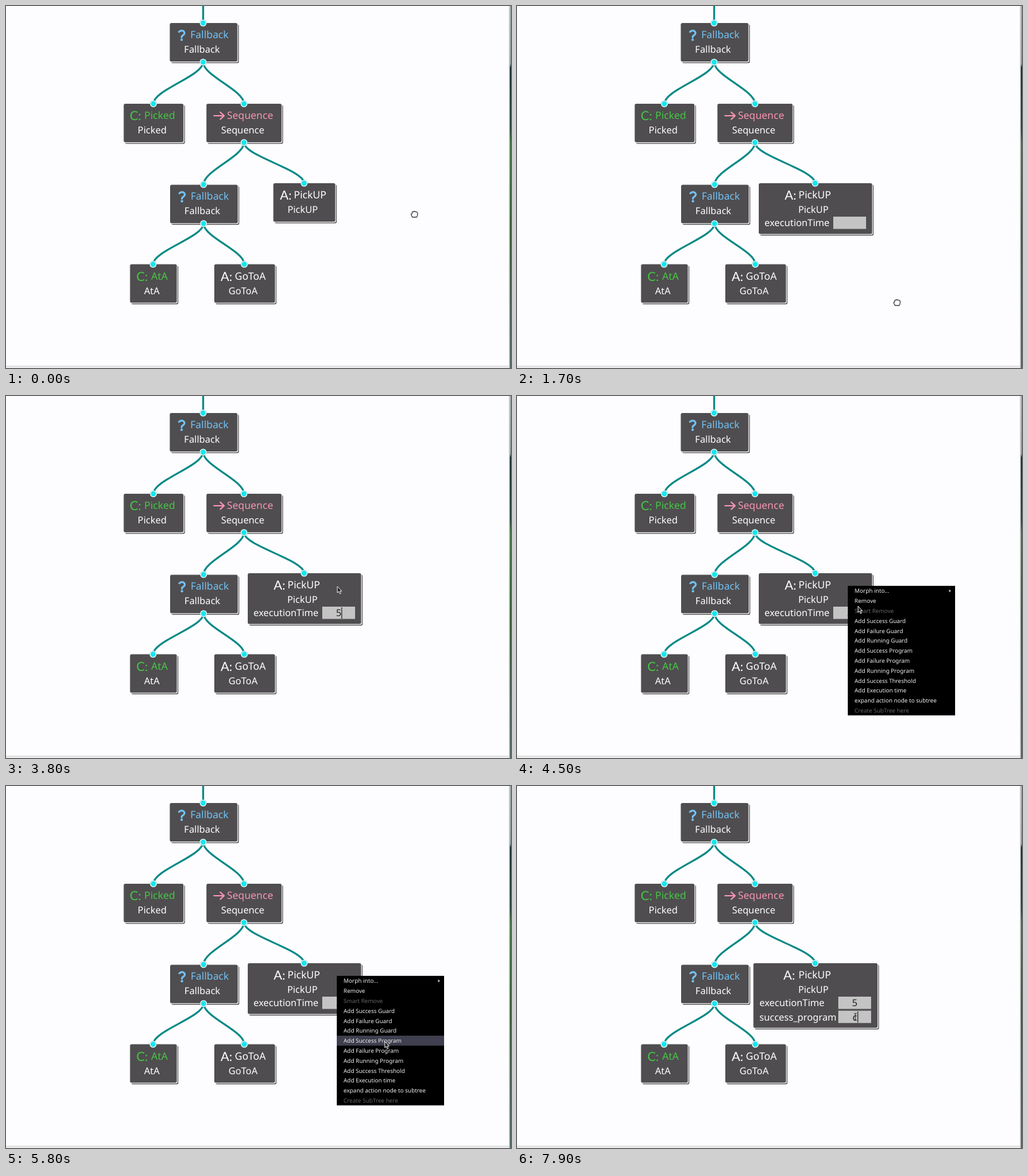
Recreate the animation shown at these times as an HTML page. Size 800 by 574 pixels, loop 8 s.

```html
<!DOCTYPE html>
<html lang="en">
<head>
<meta charset="utf-8">
<title>Behavior tree editor</title>
<style>
  html, body { margin: 0; width: 100%; height: 100%; overflow: hidden; background: #fdfcfe; }
  svg { display: block; width: 800px; height: 574px; }
  text { font-family: "Noto Sans", "Open Sans", sans-serif; fill: #fff; text-rendering: geometricPrecision; white-space: pre; }
  .edge { fill: none; stroke: #058985; stroke-width: 3; }
  .title { font-size: 16px; }
  .label { font-size: 15px; }
  .mid { text-anchor: middle; }
  .kind { font: 400 20px Lato, "Noto Sans", sans-serif; }
  .value { font-size: 15px; fill: #222; text-anchor: middle; }
  .item { font-size: 9.05px; fill: #f0f0f0; }
  .off { fill: #666; }
</style>
</head>
<body>
<svg id="stage" viewBox="0 0 800 574">
  <defs>
    <linearGradient id="strip" x1="0" y1="0" x2="0" y2="1">
      <stop offset="0" stop-color="#a3abad"/>
      <stop offset=".16" stop-color="#8d999b"/>
      <stop offset=".17" stop-color="#1d3234"/>
      <stop offset=".34" stop-color="#2c4a42"/>
      <stop offset=".38" stop-color="#4a7a48"/>
      <stop offset=".62" stop-color="#3b6339"/>
      <stop offset=".8" stop-color="#4f6358"/>
      <stop offset="1" stop-color="#5d6c6c"/>
    </linearGradient>
  </defs>
  <rect width="800" height="574" fill="#fdfcfe"/>
  <rect y="571" width="798" height="3" fill="#ececee"/>
  <rect y="570.5" width="798" height="1" fill="#d2d2d5"/>
  <rect x="796.5" width="1.5" height="574" fill="#d3d5d8"/>
  <rect x="798" width="2" height="574" fill="url(#strip)"/>
  <g id="edges"></g>
  <g id="nodes"></g>
  <g id="ports"></g>
  <g id="menu"></g>
  <g id="hand" fill="#fff" stroke="#222" stroke-width="1" stroke-linejoin="round">
    <path transform="scale(1.08)" d="M-3 4.5 L-4.6 1.5 Q-5.4 -.8 -3.4 -.6 L-3.4 -2.4 Q-3 -4 -1.6 -3.3 Q-.3 -4.8 1 -3.4 Q2.5 -4.3 3.2 -2.8 Q4.8 -2.8 4.7 -1 L4.4 2 L3.4 4.5 Z"/>
  </g>
  <path id="arrow" d="M0 0 V10 L2.3 8 L4 11.8 L5.7 11 L4.1 7.4 H7 Z" fill="#222" stroke="#fff" stroke-width=".9"/>
  <path id="beam" d="M-2 -5.5 Q0 -5.5 0 -4.5 Q0 -5.5 2 -5.5 M0 -4.5 V4.5 M-2 5.5 Q0 5.5 0 4.5 Q0 5.5 2 5.5" fill="none" stroke="#222" stroke-width="1"/>
</svg>
<script>
const LOOP = 8000, STEP = 100, ROW = 15.8, BEND = .33;
const GREEN = '#45c645', BLUE = '#72c2f5', PINK = '#f694b2', WHITE = '#fff';
const $ = id => document.getElementById(id);

function add(parent, tag, attrs, content) {
  const el = document.createElementNS('http://www.w3.org/2000/svg', tag);
  for (const key in attrs) el.setAttribute(key, attrs[key]);
  if (content !== undefined) el.textContent = content;
  parent.append(el);
  return el;
}
const show = (el, on) => el.setAttribute('visibility', on ? 'visible' : 'hidden');
const place = (el, x, y) => el.setAttribute('transform', `translate(${x} ${y})`);

// Text is placed by its visual middle line.
function write(parent, cls, x, y, str, fill) {
  const el = add(parent, 'text', { class: cls, x, y: y + 5.4 }, str);
  if (fill) el.style.fill = fill;
  return el;
}

function icon(g, kind, x, y, color) {
  const line = { fill: 'none', stroke: color, 'stroke-linecap': 'round', 'stroke-linejoin': 'round' };
  if (kind === '?') {
    add(g, 'path', { ...line, 'stroke-width': 3, d: `M${x + 2} ${y - 5} Q${x + 5} ${y - 7.7} ${x + 8.5} ${y - 6.6} Q${x + 12.5} ${y - 4} ${x + 9.5} ${y - .5} Q${x + 6.2} ${y + 1.5} ${x + 6.2} ${y + 3.4}` });
    add(g, 'circle', { cx: x + 6.2, cy: y + 7.6, r: 2, fill: color });
  } else if (kind === '>') {
    add(g, 'path', { ...line, 'stroke-width': 2.2, d: `M${x + 1} ${y} H${x + 17} m-6 -5.5 l6 5.5 l-6 5.5` });
  } else {
    add(g, 'text', { class: 'kind', x, y: y + 7, style: `fill:${color}` }, kind);
  }
}

function node(x, y, w, h, kind, color, iconX, titleX, titleY, title, subX) {
  const g = add($('nodes'), 'g', {});
  const plate = (from, to, fill) => add(g, 'rect', {
    x: x + from, y: y + from, width: w + to - from, height: h + to - from, rx: 2.5, fill
  });
  plate(1.5, 1.9, '#4c4c4c');
  plate(-1.5, .8, '#fafafa');
  plate(-.5, -.4, '#4f4d4f');
  icon(g, kind, iconX, titleY, color);
  write(g, 'title', titleX, titleY, title, color);
  write(g, 'label mid', subX, titleY + 22.7, title);
  return g;
}

function field(g, labelX, y, name, x) {
  write(g, 'label', labelX, y, name);
  add(g, 'rect', { x, y: y - 10, width: 52, height: 19.5, fill: '#c4c4c4' });
  const mid = x + 26;
  const value = write(g, 'value', mid, y, '');
  const caret = add(g, 'rect', { y: y - 9, width: 1.2, height: 18, fill: '#222' });
  return (str, focused) => {
    value.textContent = str;
    caret.setAttribute('x', mid + (str ? 4.3 : 0));
    caret.setAttribute('opacity', focused ? 1 : 0);
  };
}

function edge(x1, y1, x2, y2) {
  const pull = (y2 - y1) * BEND;
  add($('edges'), 'path', { class: 'edge', d: `M${x1} ${y1} C${x1} ${y1 + pull} ${x2} ${y2 - pull} ${x2} ${y2}` });
}

function port(x, y) {
  add($('ports'), 'circle', { cx: x, cy: y, r: 5.6, fill: '#8a9c9c' });
  add($('ports'), 'circle', { cx: x, cy: y, r: 4.7, fill: '#14e7ee', stroke: '#fff', 'stroke-width': 1.1 });
}

edge(312.3, -40, 312.3, 27);
edge(312.3, 89, 233.5, 155);
edge(312.3, 89, 377, 155);
edge(377, 216.5, 313, 283);
edge(377, 216.5, 472.3, 281);
edge(313, 345, 233, 409.5);
edge(313, 345, 377.5, 409.5);
[[312.3, 27], [312.3, 89], [233.5, 155], [377, 155], [377, 216.5], [313, 283],
 [472.3, 281], [313, 345], [233, 409.5], [377.5, 409.5]].forEach(p => port(...p));

node(260, 27.5, 107, 61, '?', BLUE, 272, 292, 46, 'Fallback', 310.5);
node(187, 155.5, 94.5, 61, 'C:', GREEN, 196, 219, 174, 'Picked', 231.5);
node(318, 155.5, 119, 61, '>', PINK, 328.5, 350, 174, 'Sequence', 375);
node(260.5, 284, 107, 61, '?', BLUE, 272.5, 292.5, 302, 'Fallback', 311);
node(197, 410, 74, 61, 'C:', GREEN, 206.5, 230, 428.5, 'AtA', 231);
node(330.5, 410, 96, 61, 'A:', WHITE, 340, 362.5, 428.5, 'GoToA', 375.5);

// The action node in its three sizes.
const boxes = [[424, 281.5, 98, 61], [383.5, 281.5, 179.5, 80.5], [375, 281.5, 196.5, 102.5]];
const sizes = [[434, 456, 470], [424, 446, 469.5], [422, 446, 469.5]].map(([iconX, titleX, subX], i) =>
  node(...boxes[i], 'A:', WHITE, iconX, titleX, 299.6, 'PickUP', subX));
const timeAlone = field(sizes[1], 392, 344, 'executionTime', 501);
const timeField = field(sizes[2], 384, 344, 'executionTime', 509);
const programField = field(sizes[2], 384, 366.3, 'success_program', 509);
timeField('5', false);

const items = ['Morph into...', 'Remove', 'Smart Remove', 'Add Success Guard', 'Add Failure Guard',
  'Add Running Guard', 'Add Success Program', 'Add Failure Program', 'Add Running Program',
  'Add Success Threshold', 'Add Execution time', 'expand action node to subtree', 'Create SubTree here'];
const disabled = [2, 12];
const menu = $('menu');
add(menu, 'rect', { width: 170, height: 205.4, fill: '#000' });
const hover = add(menu, 'rect', { width: 170, height: ROW, fill: '#3f3f4f' });
items.forEach((name, i) => add(menu, 'text', {
  class: disabled.includes(i) ? 'item off' : 'item', x: 10.8, y: 11.3 + i * ROW
}, name));
add(menu, 'path', { d: 'M160.5 5.8 l3.2 2.2 l-3.2 2.2 z', fill: '#ccc' });

// Pointer path: time, x, y
const path = [
  [0, 647, 330], [500, 518, 306], [600, 518, 306], [1100, 606, 444], [1300, 602, 470],
  [1700, 602, 470], [2300, 530, 345], [3100, 530, 345], [3700, 525, 302], [4200, 524, 301],
  [5200, 599, 450], [5700, 600, 405], [6400, 600, 405], [7000, 536, 366], [LOOP, 536, 366]
];
const menus = [{ from: 600, to: 1400, x: 518, y: 306 }, { from: 4200, to: 5900, x: 524, y: 301 }];

function pointer(t) {
  const i = path.findIndex(p => p[0] > t);
  const [t0, x0, y0] = path[i - 1], [t1, x1, y1] = path[i];
  const k = (t - t0) / (t1 - t0), e = k * k * (3 - 2 * k);
  return [x0 + (x1 - x0) * e, y0 + (y1 - y0) * e];
}

const inside = (x, y, [bx, by, w, h]) => x >= bx && x <= bx + w && y >= by && y <= by + h;

function draw(t) {
  const [x, y] = pointer(t);
  const open = menus.find(m => t >= m.from && t < m.to);
  const size = menus.filter(m => t >= m.to).length;
  sizes.forEach((g, i) => show(g, i === size));
  timeAlone(t < 2800 ? '' : '5', t >= 2400);
  programField(t < 7700 ? '' : 'c', t >= 7200);

  show(menu, open);
  if (open) {
    place(menu, open.x, open.y);
    const row = Math.floor((y - open.y - .1) / ROW);
    hover.setAttribute('y', row * ROW + .1);
    hover.setAttribute('opacity', items[row] && !disabled.includes(row) ? 1 : 0);
  }

  const inputs = [[], [[501, 334, 52, 20]], [[509, 334, 52, 20], [509, 356, 52, 20]]][size];
  const shape = open ? 'arrow'
    : inputs.some(b => inside(x, y, b)) ? 'beam'
    : inside(x, y, boxes[size]) ? 'arrow' : 'hand';
  for (const id of ['hand', 'arrow', 'beam']) show($(id), id === shape);
  place($(shape), x, y);
}

const start = performance.now();
function tick() {
  const t = (performance.now() - start) % LOOP;
  draw(Math.floor(t / STEP) * STEP);
  requestAnimationFrame(tick);
}
tick();
</script>
</body>
</html>
```
